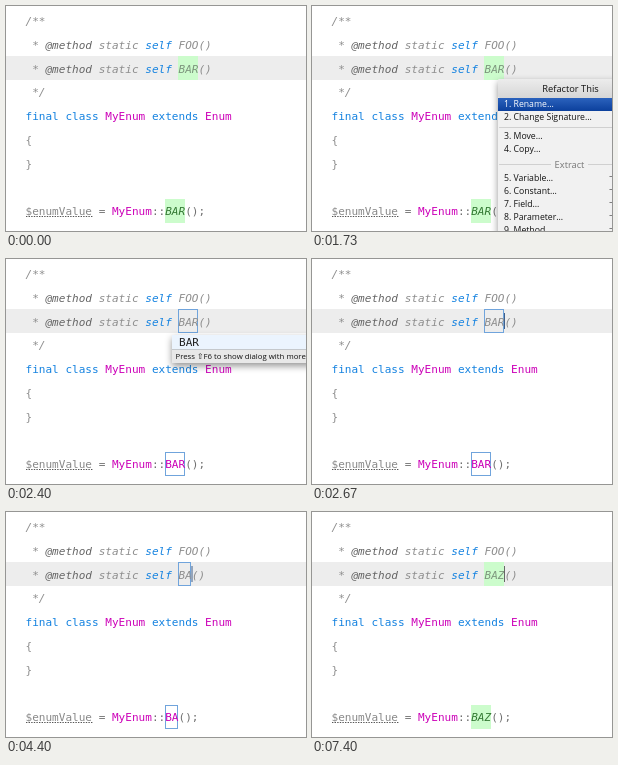
Recreate the animation shown at these times as an HTML page. Size 300 px wide and 225 px high, loop 7470 ms.

```html
<!DOCTYPE html>
<html lang="en">
<head>
<meta charset="utf-8">
<title>Rename refactoring</title>
<style>
html, body { margin: 0; width: 100%; height: 100%; overflow: hidden; background: #fff; }
svg { display: block; width: 100%; height: 100%; }
text { white-space: pre; }
.code { font: 11.05px "DejaVu Sans Mono", monospace; }
.ui { font: 8.7px "Open Sans", sans-serif; }
.it { font-style: italic; }
</style>
</head>
<body>
<svg id="stage" viewBox="0 0 300 225" xmlns="http://www.w3.org/2000/svg">
  <defs>
    <linearGradient id="title" x2="0" y2="1">
      <stop stop-color="#ececec"/><stop offset="1" stop-color="#d6d6d6"/>
    </linearGradient>
    <linearGradient id="pick" x2="0" y2="1">
      <stop stop-color="#2b62bd"/><stop offset="1" stop-color="#0c409c"/>
    </linearGradient>
    <filter id="shadow" x="-20%" y="-30%" width="140%" height="180%">
      <feDropShadow dx="0" dy="3" stdDeviation="3.5" flood-opacity=".42"/>
    </filter>
  </defs>
</svg>
<script>
const LOOP = 7470, LEFT = 19.5, CHAR = 6.652, ROW = 23.75;
const GREY = '#8e8e8e', BLUE = '#1482e0', PINK = '#cc00b8', GREEN = '#357a35';
const stage = document.getElementById('stage');

function add(parent, tag, attrs, content) {
  const node = document.createElementNS('http://www.w3.org/2000/svg', tag);
  set(node, attrs);
  if (content) node.textContent = content;
  return parent.appendChild(node);
}
function set(node, attrs) {
  for (const key in attrs) node.setAttribute(key, attrs[key]);
}
const colX = col => LEFT + col * CHAR;
const rowTop = row => 2.5 + row * ROW;
const rect = (parent, x, y, width, height, fill, more) =>
  add(parent, 'rect', { x, y, width, height, fill, ...more });
const code = (row, col, text, fill, italic) =>
  add(stage, 'text', { x: colX(col), y: rowTop(row) + 16.5, fill, class: italic ? 'code it' : 'code' }, text);
const label = (parent, x, y, text, more) =>
  add(parent, 'text', { x, y, class: 'ui', fill: '#111', ...more }, text);
const show = (node, on) => node.setAttribute('visibility', on ? 'visible' : 'hidden');

rect(stage, 0, 0, 300, 225, '#fff');
rect(stage, 0, 50, 300, 24, '#ededed');

// An editable name: its marker, the text and whatever follows it
function slot(row, col, tail, italicTail) {
  const y = Math.round(rowTop(row));
  const x = Math.round(colX(col));
  return {
    x,
    mark: rect(stage, x, y, 20, 24, '#ccfccc'),
    box: add(stage, 'rect', { x: x + .5, y: y + .5, width: 19, height: 23, fill: 'none', stroke: '#70a4dc' }),
    name: code(row, col, 'BAR', GREY, true),
    tail: code(row, col + 3, tail, italicTail ? GREY : '#707070', italicTail),
    col
  };
}
const decl = slot(2, 23, '()', true);
const call = slot(8, 21, '();', false);

code(0, 0, '/**', GREY, true);
['FOO()', ''].forEach((name, i) => {
  const row = i + 1;
  code(row, 1, '*', GREY, true);
  code(row, 3, '@method', '#666', true);
  code(row, 11, 'static', GREY, true);
  code(row, 18, 'self', BLUE, true);
  if (name) code(row, 23, name, GREY, true);
});
code(3, 1, '*/', GREY, true);
code(4, 0, 'final class', BLUE);
code(4, 12, 'MyEnum', PINK);
code(4, 19, 'extends', BLUE);
code(4, 27, 'Enum', PINK);
code(5, 0, '{', GREY);
code(6, 0, '}', GREY);
code(8, 0, '$enumValue', '#888');
code(8, 11, '=', '#707070');
code(8, 13, 'MyEnum', PINK);
code(8, 19, '::', '#707070');
add(stage, 'path', { d: 'M20 210.5H87', stroke: '#555', 'stroke-dasharray': '1.4 1.2' });
const caret = rect(stage, 192, 54, 1, 16, '#444');

// Refactoring menu
const menu = add(stage, 'g', {});
rect(menu, 186, 73, 140, 170, '#f1f1f1', { filter: 'url(#shadow)', rx: 2 });
rect(menu, 186, 73, 140, 19, 'url(#title)', { rx: 2 });
rect(menu, 186, 92, 140, 13, 'url(#pick)');
label(menu, 258.5, 86, 'Refactor This', { 'text-anchor': 'middle', style: 'font-size:9.3px' });
const items = [
  [101, 'Rename'], [114, 'Change Signature'], [133, 'Move'], [146, 'Copy'], [175, 'Variable'],
  [188, 'Constant'], [201, 'Field'], [213.5, 'Parameter'], [227, 'Method']
];
items.forEach(([y, text], i) => {
  label(menu, 192, y, `${i + 1}. ${text}…`, { fill: i ? '#111' : '#fff' });
  if (i > 3) label(menu, 297, y, '⌥', { style: 'font-family:"DejaVu Sans",sans-serif', fill: '#555' });
});
add(menu, 'path', { d: 'M187 121.5H300M187 158.5H239M276 158.5H300', stroke: '#d0d0d0' });
label(menu, 257.5, 161.5, 'Extract', { 'text-anchor': 'middle', fill: '#777', style: 'font-size:9.3px' });

// Name suggestion with its hint
const hint = add(stage, 'g', {});
rect(hint, 166, 76, 150, 28, '#e8e8e8', { filter: 'url(#shadow)' });
rect(hint, 166, 76, 150, 14, '#ebf4fe');
add(hint, 'path', { d: 'M166 90.5H300', stroke: '#c4c8cc' });
add(hint, 'text', { x: 173, y: 87, class: 'code', fill: '#222' }, 'BAR');
label(hint, 169.5, 99.5, 'Press ⇧F6 to show dialog with more', { style: 'font-size:7.8px' });

function place(part, name, editing, lit) {
  const width = name.length * CHAR;
  part.name.textContent = name;
  set(part.tail, { x: colX(part.col + name.length) });
  set(part.box, { width: Math.round(width) - 1 });
  show(part.box, editing);
  show(part.mark, lit);
}

function draw(t) {
  const within = (from, to) => t >= from && t < to;
  const name = t < 4200 ? 'BAR' : t < 5070 ? 'BA' : 'BAZ';
  const editing = within(1930, 6200);
  const lit = t < 1930 || t >= 6670;
  place(decl, name, editing, lit);
  place(call, name, editing, lit);
  set(decl.name, { fill: lit ? '#7d957d' : GREY });
  set(call.name, { fill: lit ? GREEN : PINK, class: lit ? 'code it' : 'code' });
  show(menu, within(200, 1800));
  show(hint, within(1870, 2670));
  show(caret, within(2670, 5930) || t >= 6200);
  set(caret, { x: name === 'BA' ? 185.5 : 192, fill: editing ? '#3f5f8a' : '#666' });
}

const start = performance.now();
function tick() {
  draw((performance.now() - start) % LOOP);
  requestAnimationFrame(tick);
}
tick();
</script>
</body>
</html>
```
